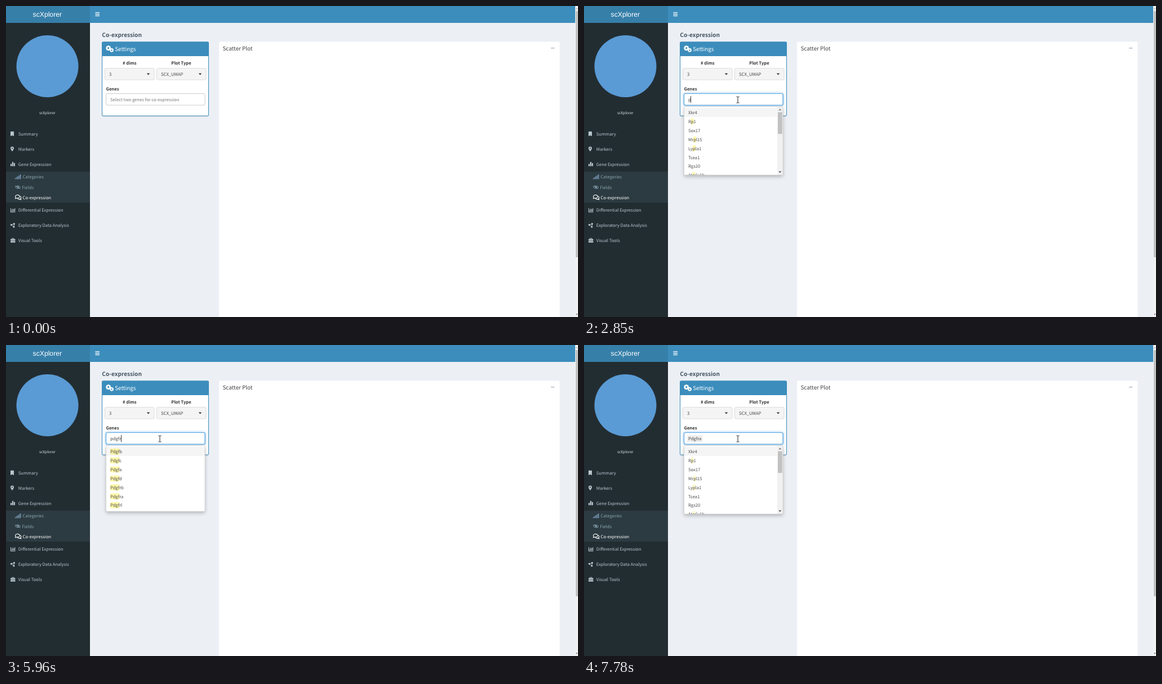
These frames come from a looping animation (1015x552 px, 8 s). An HTML page with a canvas:

```html
<!DOCTYPE html>
<html lang="en">
<head>
<meta charset="utf-8">
<title>scXplorer</title>
<style>
  html, body { margin: 0; width: 100%; height: 100%; overflow: hidden; background: #ecf0f5; }
  canvas { display: block; width: 1015px; height: 552px; }
</style>
</head>
<body>
<canvas id="stage" width="1015" height="552"></canvas>
<script>
const ctx = document.getElementById('stage').getContext('2d');
const SANS = '"Noto Sans CJK JP","Noto Sans CJK SC","Noto Sans CJK KR","Noto Sans CJK TC","Noto Sans CJK","Open Sans",sans-serif';
const LOOP = 8000;
const BODY = 7.65, TITLE = 9.82, ROW = 15.9;
const BLUE = '#3c8dbc', MENU = '#b8c7ce', SUBMENU = '#8aa4af';

const IDLE_LIST = ['Xkr4', 'Rp1', 'Sox17', 'Mrpl15', 'Lypla1', 'Tcea1', 'Rgs20', 'Atp6v1h'];
const P_LIST = ['Pam', 'Pdc', 'Pah', 'Pyy', 'Pnp', 'Pbk', 'Plg', 'Pgr'];
const PD_LIST = ['Pdc', 'Pdxk', 'Pdcl3', 'Pde6d', 'Pdcd1', 'Pde7b', 'Pdss2', 'Pdgfb'];
const PDG_LIST = ['Pdgfb', 'Pdgfc', 'Pdgfa', 'Pdgfd', 'Pdgfrb', 'Pdgfra', 'Pdgfrl'];

const FOCUS = 1530, PICKED = 6920;
const typing = [[0, ''], [2850, 'p'], [3380, 'pd'], [4460, 'pdg'], [5690, 'pdgf'], [5960, 'pdgfr'], [6040, 'pdgfra'], [PICKED, '']];
const caretOn = [[0, false], [FOCUS, true], [2050, false], [2580, true], [3920, false], [4460, true],
  [4960, false], [5520, true], [6720, false], [7250, true], [7780, false]];
const menus = [
  [0, null],
  [FOCUS, { query: 'p', items: IDLE_LIST, glow: 0.4 }],
  [3060, { query: 'p', items: P_LIST, glow: 0.4 }],
  [3600, { query: 'pd', items: PD_LIST, glow: 0.4 }],
  [4720, { query: 'pdg', items: PDG_LIST, glow: 0.4 }],
  [5770, { query: 'pdgf', items: PDG_LIST, glow: 0.4 }],
  [6170, { query: 'pdgfr', items: PDG_LIST.slice(4), glow: 0.4 }],
  [6310, { query: 'pdgfra', items: ['Pdgfra'], glow: 0.4 }],
  [PICKED, { query: 'p', items: IDLE_LIST, glow: 0.25 }]
];
const pointerStops = [[1200, [270.5, 170]], [1250, [270.5, 169]], [FOCUS, [263.5, 169]], [1680, [270.5, 167]], [1850, [273, 166.5]]];

const at = (track, t) => track.reduce((value, [start, next]) => t >= start ? next : value, track[0][1]);

function rect(x, y, w, h, color) {
  ctx.fillStyle = color;
  ctx.fillRect(x, y, w, h);
}

function box(x, y, w, h, radius, fill, border, lineWidth = 1) {
  ctx.beginPath();
  ctx.roundRect(x, y, w, h, radius);
  if (fill) { ctx.fillStyle = fill; ctx.fill(); }
  if (border) { ctx.strokeStyle = border; ctx.lineWidth = lineWidth; ctx.stroke(); }
}

function circle(x, y, r, color) {
  ctx.beginPath();
  ctx.arc(x, y, r, 0, Math.PI * 2);
  ctx.fillStyle = color;
  ctx.fill();
}

function shape(d, color) {
  ctx.fillStyle = color;
  ctx.fill(new Path2D(d));
}

function line(d, color, width = 1) {
  ctx.strokeStyle = color;
  ctx.lineWidth = width;
  ctx.stroke(new Path2D(d));
}

function setFont(size, weight = 400, family = SANS) {
  ctx.font = `${weight} ${size}px ${family}`;
  ctx.textRendering = 'geometricPrecision';
}

function text(str, x, y, color, { size = BODY, weight, align = 'left', family } = {}) {
  setFont(size, weight, family);
  ctx.textAlign = align;
  ctx.fillStyle = color;
  ctx.fillText(str, x, y);
}

function textWidth(str) {
  setFont(BODY);
  return ctx.measureText(str).width;
}

function withShadow(color, blur, dy, draw) {
  ctx.save();
  ctx.shadowColor = color;
  ctx.shadowBlur = blur;
  ctx.shadowOffsetY = dy;
  draw();
  ctx.restore();
}

function gear(x, y, r) {
  ctx.strokeStyle = '#fff';
  ctx.lineWidth = r * 0.5;
  ctx.beginPath();
  ctx.arc(x, y, r * 0.6, 0, Math.PI * 2);
  ctx.stroke();
  ctx.lineWidth = r * 0.42;
  for (let i = 0; i < 8; i++) {
    const a = i * Math.PI / 4;
    ctx.beginPath();
    ctx.moveTo(x + Math.cos(a) * r * 0.7, y + Math.sin(a) * r * 0.7);
    ctx.lineTo(x + Math.cos(a) * r, y + Math.sin(a) * r);
    ctx.stroke();
  }
}

function drawMenuIcons() {
  shape('M8 222.7h6v8.6l-3-1.9-3 1.9z', MENU);
  shape('M11 258.2C9.6 256 8 254.4 8 252.6a3 3 0 0 1 6 0c0 1.800-1.600 3.400-3 5.600z', MENU);
  circle(11, 252.5, 1.1, '#222d32');
  [[8, 4], [10.9, 7.5], [13.8, 5.5]].forEach(([x, h]) => rect(x, 284.3 - h, 2.2, h, MENU));
  for (let i = 0; i < 5; i++) rect(16 + i * 2.25, 305.3 - i * 1.6, 1.4, 2 + i * 1.6, '#7f9fc0');
  line('M16.300 321.500q4.700-5 9.400 0q-4.700 5-9.400 0zM16.500 319l9 5.500', SUBMENU, 0.9);
  circle(21.3, 321.5, 1.5, SUBMENU);
  line('M16.600 341.700l.7-1.800a3.900 2.900 0 1 1 2 1.100zM24.200 337.500a3 2.600 0 0 1 1.800 4.400l.7 1.700-2.200-.7q-3.200.7-4.300-1.300', '#fff', 1.1);
  line('M8.500 359v6.700h8', MENU, 1.1);
  [[10.5, 3], [12.3, 5], [14.1, 3.5], [15.7, 5.5]].forEach(([x, h]) => rect(x - 0.5, 364.5 - h, 1.1, h, MENU));
  line('M14.500 386.800l-5 1.500 4.300 3.800zM9.500 388.300', MENU, 0.9);
  [[14.4, 386.7], [9.5, 388.4], [13.9, 392]].forEach(([x, y]) => circle(x, y, 1.6, MENU));
  box(8, 413.8, 8.5, 2.8, 0.8, MENU);
  rect(8, 417.3, 8.5, 2.5, MENU);
  line('M10.400 414v-1.500h3.700v1.500', MENU, 0.9);
}

function drawSidebar() {
  rect(0, 0, 149, 552, '#222d32');
  rect(0, 294, 149, 55, '#2c3b41');
  rect(0, 0, 149, 30, '#367fa9');
  text('scXplorer', 73.3, 19, '#fff', { size: 12.2, align: 'center', family: '"Liberation Sans",Arial,sans-serif' });
  circle(73.5, 107, 55, '#5a9bd5');
  text('scXplorer', 73.3, 192.2, '#e4eaec', { size: 6.55, align: 'center' });
  [['Summary', 230], ['Markers', 256.8], ['Gene Expression', 283.7], ['Differential Expression', 365.4],
    ['Exploratory Data Analysis', 392.2], ['Visual Tools', 419]].forEach(([label, y]) => text(label, 21.8, y, MENU));
  text('Categories', 29.4, 306.2, SUBMENU);
  text('Fields', 28.2, 324.5, SUBMENU);
  text('Co-expression', 29.6, 342.8, '#fff');
  drawMenuIcons();
}

function drawSelect(x, width, label) {
  box(x + 0.5, 110.5, width, 20.5, 2, '#f4f4f4', '#ddd');
  text(label, x + 8, 123.8, '#444');
  shape(`M${x + 74.700} 119.500h5.600l-2.800 3z`, '#333');
}

function drawPage() {
  rect(0, 0, 1015, 552, '#ecf0f5');
  rect(149, 0, 861, 30, BLUE);
  [11.2, 14, 16.8].forEach(y => rect(158.4, y, 7.6, 1.3, '#fff'));
  drawSidebar();

  rect(1010, 0, 5, 552, '#f1f1f1');
  rect(1011, 9, 4, 437, '#c1c1c1');
  shape('M1011.300 5.500h3l-1.500-2z', '#a3a3a3');
  shape('M1011.300 546.500h3l-1.500 2z', '#505050');

  text('Co-expression', 170.3, 55, '#435360', { size: 10.1, weight: 600 });
  box(378, 63.5, 604.5, 500, 2, '#fff');
  text('Scatter Plot', 384.5, 78.8, '#444', { size: TITLE });
  rect(967, 74.2, 6.3, 1.1, '#97a0b3');

  withShadow('rgba(0,0,0,.1)', 1, 1, () => box(170.5, 64, 189, 131, 2, '#fff', BLUE));
  box(170, 63.5, 190, 25.5, [2, 2, 0, 0], BLUE);
  gear(181.7, 74.7, 4.6);
  gear(187.5, 78.4, 3.6);
  text('Settings', 193.2, 79.8, '#fff', { size: TITLE });

  text('# dims', 219.3, 104.2, '#333', { weight: 700, align: 'center' });
  text('Plot Type', 311, 104.2, '#333', { weight: 700, align: 'center' });
  drawSelect(175, 87.5, '3');
  drawSelect(267, 87.5, 'SCX_UMAP');
  text('Genes', 177.4, 149.6, '#333', { weight: 700 });
}

function drawInput(t) {
  const focused = t >= FOCUS, picked = t >= PICKED;
  const typed = at(typing, t);
  if (focused) {
    withShadow('rgba(102,175,233,.7)', 4, 0, () => box(177.5, 155.5, 175.5, 20.5, 2, '#fff', '#66afe9'));
    box(177.5, 155.5, 175.5, 20.5, 2, '#fff', '#5ba6e0', 1.2);
  } else {
    box(177.5, 155.5, 175.5, 20.5, 2, '#fff', '#ccc');
  }
  if (picked) {
    box(183, 160, 27.5, 12.5, 1.5, '#efefef');
    text('Pdgfra', 185, 169, '#444');
  } else if (typed) {
    text(typed, 185, 169, '#444');
  } else {
    text('Select two genes for co-expression', 185, 169, '#777');
  }
  if (at(caretOn, t)) rect(picked ? 212 : Math.floor(185 + textWidth(typed)), 160, 1, 12, '#333');
}

function drawDropdown(t) {
  const menu = at(menus, t);
  if (!menu) return;
  const { query, items, glow } = menu;
  const fullHeight = items.length * ROW + 6;
  const scrolls = fullHeight > 122;
  const height = Math.min(fullHeight, 122);
  withShadow('rgba(0,0,0,.25)', 6, 3, () => box(177.5, 178.5, 175.5, height - 0.5, 2, '#fff'));

  ctx.save();
  ctx.beginPath();
  ctx.rect(178, 178, 175, height);
  ctx.clip();
  rect(178, 181, 175, ROW, '#f5f5f5');
  items.forEach((item, i) => {
    const top = 181 + i * ROW;
    const start = item.toLowerCase().indexOf(query);
    if (start >= 0) {
      const x = 185 + textWidth(item.slice(0, start));
      const w = textWidth(item.slice(start, start + query.length));
      box(x, top + 2.7, w, 10.7, 0.6, `rgba(255,237,40,${glow})`);
    }
    text(item, 185, top + 11, '#4c4c4c');
  });
  if (scrolls) {
    rect(343, 179, 10, 121, '#f1f1f1');
    rect(344, 188.5, 7.6, 38.5, '#c1c1c1');
    shape('M345.300 185.200h5l-2.500-2.700z', '#777');
    shape('M345.300 293.500h5l-2.500 2.700z', '#444');
  }
  ctx.restore();
  box(177.5, 178.5, 175.5, height - 0.5, 2, null, '#d0d0d0', 0.8);
}

function pointerPosition(t) {
  if (t >= 1200) return at(pointerStops, t);
  const progress = Math.floor((t - 430) / (770 / 12)) / 12;
  const left = (1 - progress) ** 2.5;
  return [270.5 + 504 * left, 170 + 341 * left];
}

function drawPointer(t) {
  if (t < 430) return;
  const [x, y] = pointerPosition(t);
  if (x > 177 && x < 353 && y > 155 && y < 176) {
    line(`M${x} ${y - 5}v10M${x - 2.5} ${y - 5.500}h2l.5.5.5-.5h2M${x - 2.5} ${y + 5.500}h2l.5-.5.5.5h2`, '#222', 1);
  } else {
    const arrow = `M${x} ${y}v9.500l2.200-2 1.500 3.300 1.300-.6-1.500-3.200h3z`;
    shape(arrow, '#fff');
    line(arrow, '#111', 0.7);
  }
}

function frame(now) {
  const t = now % LOOP;
  drawPage();
  drawInput(t);
  drawDropdown(t);
  drawPointer(t);
  requestAnimationFrame(frame);
}
requestAnimationFrame(frame);
</script>
</body>
</html>
```
